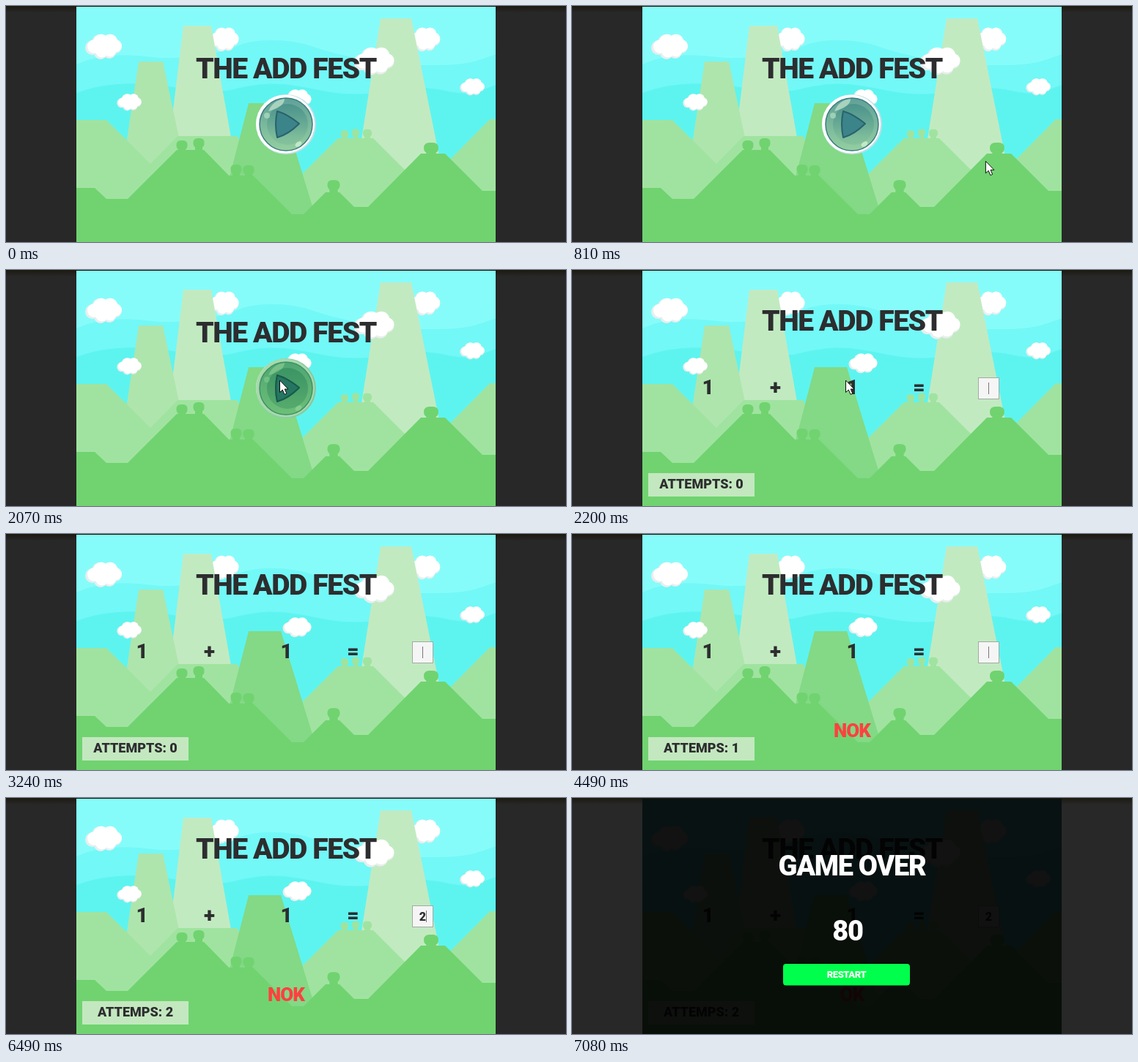
Recreate the animation shown at these times as an HTML page. Size 764x323 px, loop 8000 ms.

```html
<!DOCTYPE html>
<html lang="en">
<head>
<meta charset="utf-8">
<title>The Add Fest</title>
<style>
  html, body { margin: 0; width: 764px; height: 323px; overflow: hidden; background: #282828; }
  svg { display: block; }
  text { font: 900 28px Roboto, "Open Sans", sans-serif; text-anchor: middle; fill: #2d2d2f; letter-spacing: -.035em; }
  #title { font-size: 39px; }
  #attempts { font-size: 18px; letter-spacing: 0; }
  #result { font-size: 26px; fill: #ff4040; }
  #digit { font-size: 16px; }
  #over text { fill: #fff; }
  #over .big { font-size: 38px; }
  #over .small { font-size: 13px; }
</style>
</head>
<body>
<svg width="764" height="323" viewBox="0 0 764 323">
  <defs>
    <linearGradient id="edge" x2="0" y2="1">
      <stop stop-color="#191808"/><stop offset=".25" stop-color="#1e1d18"/><stop offset="1" stop-color="#282828"/>
    </linearGradient>
    <linearGradient id="glass" x2="0" y2="1">
      <stop stop-color="#5fa198"/><stop offset="1" stop-color="#94cfa0"/>
    </linearGradient>
    <linearGradient id="shade" x2="0" y2="1">
      <stop stop-color="#2f7d7c" stop-opacity=".45"/><stop offset=".8" stop-color="#2f7d7c" stop-opacity=".1"/>
    </linearGradient>
    <clipPath id="stage"><path d="M96 1H668V323H96Z"/></clipPath>
    <g id="puffs">
      <circle cx="-15" cy="1" r="10"/><circle cx="-5" cy="-6" r="11"/><circle cx="8" cy="-6" r="11"/>
      <circle cx="16" cy="0" r="9"/><circle cx="8" cy="7" r="9"/><circle cx="-4" cy="8" r="9"/>
    </g>
    <g id="cloud">
      <use href="#puffs" fill="#e9eeee"/>
      <use href="#puffs" fill="#fff" transform="translate(1.5 -1.5) scale(.94)"/>
    </g>
    <g id="tree">
      <rect x="-7.5" y="-14" width="15" height="13" rx="5.5"/><path d="M-5-6H5V3H-5Z"/>
    </g>
    <path id="arrow" d="M370 144Q384 148 400 161Q385 176 370 180Q366 162 370 144Z" stroke-width="2" stroke-linejoin="round"/>
  </defs>

  <path fill="#282828" d="M0 0H764V323H0Z"/>
  <path fill="url(#edge)" d="M0 0H764V9H0Z"/>

  <g clip-path="url(#stage)">
    <path fill="#86fcfa" d="M96 0H668V323H96Z"/>
    <path fill="#72f8f7" d="M96 80C130 64 165 66 200 70S290 66 315 55S385 44 420 56S510 80 570 81S640 76 668 66V323H96Z"/>
    <path fill="#5df4f0" d="M96 119C130 106 165 104 205 108S275 122 310 114S365 104 400 110S460 124 500 119S560 108 600 116S640 118 668 108V323H96Z"/>
    <use href="#cloud" transform="translate(297 46) scale(.82 .95)"/>
    <use href="#cloud" transform="translate(571 46) scale(.85 .95)"/>
    <path fill="#c2eac1" d="M242 27H280L307 180V240H216ZM511 17H553L598 240H478L485 182Z"/>
    <path fill="#aee5ad" d="M181 76H214L236 180V240H157L165 182Z"/>
    <use href="#cloud" transform="translate(133 56)"/>
    <use href="#cloud" transform="translate(502 76) scale(1.1)"/>
    <use href="#cloud" transform="translate(636 111) scale(.67)"/>
    <use href="#cloud" transform="translate(168 132) scale(.67)"/>
    <use href="#cloud" transform="translate(397 128) scale(.78)"/>
    <g fill="#a0e3a0">
      <path d="M96 156H137L197 216L234 178H315L370 264L453 181H501L548 228L596 220L660 155H668V323H96Z"/>
      <use href="#tree" transform="translate(462 180) scale(.7)"/>
      <use href="#tree" transform="translate(477 179) scale(.65 .75)"/>
      <use href="#tree" transform="translate(493 180) scale(.8)"/>
    </g>
    <path fill="#83d985" d="M331 133H375L421 284V300H288Z"/>
    <g fill="#70d370">
      <path d="M96 249H121L137 264H166L233 197H270L304 232H337L390 285H406L436 255H455L475 275H494L566 202H599L650 253H668V323H96Z"/>
      <use href="#tree" transform="translate(240 198)"/>
      <use href="#tree" transform="translate(263 195)"/>
      <use href="#tree" transform="translate(314 231)"/>
      <use href="#tree" transform="translate(331 232)"/>
      <use href="#tree" transform="translate(447 253) scale(1.13 1.06)"/>
      <use href="#tree" transform="translate(580 203) scale(1.32 1.15)"/>
    </g>

    <text id="title" x="382" y="98.5">THE ADD FEST</text>

    <g id="play">
      <circle cx="382" cy="162" r="41" fill="#c2dfe8"/>
      <circle cx="381" cy="161.5" r="40" fill="#fff"/>
      <circle cx="382" cy="162" r="36" fill="url(#glass)" stroke="#3a7c80" stroke-width="1.5"/>
      <circle cx="384" cy="162" r="28" fill="url(#shade)"/>
      <path fill="#c5e6cf" opacity=".7" d="M358 144Q364 129 380 127Q380 138 358 144Z"/>
      <circle cx="356" cy="150" r="4" fill="#a9d8bb" opacity=".8"/>
      <ellipse cx="399" cy="189" rx="5" ry="3" transform="rotate(-35 399 189)" fill="#c3e8c8"/>
      <use href="#arrow" fill="#3b848a" stroke="#2a626b"/>
      <g id="press">
        <circle cx="382" cy="162" r="41" fill="#3caa46" opacity=".45"/>
        <circle cx="384" cy="162" r="28" fill="#1d7048" opacity=".2"/>
        <use href="#arrow" fill="#257660" stroke="#185a4c"/>
      </g>
    </g>

    <g id="game">
      <text x="185" y="169.5">1</text>
      <text x="277" y="169.5">+</text>
      <text x="382" y="169.5">1</text>
      <text x="473" y="169.5">=</text>
      <rect x="554.5" y="147.5" width="28" height="29" fill="#f5f5f5" stroke="#a3aaa3"/>
      <text id="digit" x="568" y="167.5"></text>
      <path id="caret" d="M.5 154V170" stroke="#777"/>
      <rect x="104" y="278" width="145" height="32" fill="#c3e8bf"/>
      <text id="attempts" x="176.5" y="298.5"></text>
      <text id="result" x="382" y="278"></text>
    </g>

    <g id="over">
      <path d="M96 0H668V323H96Z" opacity=".93"/>
      <text class="big" x="382" y="106">GAME OVER</text>
      <text class="big" x="376" y="195">80</text>
      <rect x="288" y="227" width="173" height="29.5" rx="4" fill="#00ff4c"/>
      <text class="small" x="374.5" y="245.5">RESTART</text>
    </g>
  </g>

  <path id="cursor" d="M.5 0V16.5L4.3 13L7 19.3L9.8 18L7.2 12H12Z" fill="#fff" stroke="#111" stroke-linejoin="round"/>
</svg>
<script>
const LOOP = 8000, START = 2200, END = 7080;
const $ = id => document.getElementById(id);
const show = (id, on) => $(id).style.display = on ? '' : 'none';
const write = (id, s) => { if ($(id).textContent !== s) $(id).textContent = s; };

// Input field: time, typed digit, caret x (0 = hidden)
const field = [
  [START, '', 568], [2690, '', 0], [3240, '', 568], [3830, '', 0],
  [4150, '1', 0], [4490, '', 568], [5080, '', 0], [5430, '3', 573],
  [5900, '', 568], [6490, '2', 573], [END, '2', 0]
];

function moveCursor(t) {
  show('cursor', t >= 680 && t < 3240);
  const p = Math.max(0, Math.min(1, Math.floor((t - 680) / 67.5) / 8)), q = 1 - p;
  const curve = (a, b, c) => q * q * a + 2 * p * q * b + p * p * c;
  $('cursor').setAttribute('transform', `translate(${curve(606, 430, 373)} ${curve(250, 85, 151)})`);
  $('cursor').setAttribute('opacity', t < 3100 ? 1 : t < 3170 ? .6 : .3);
}

function draw(now) {
  const t = now % LOOP, playing = t >= START;
  $('title').setAttribute('y', playing ? 82.5 : 98.5);
  show('play', !playing);
  show('game', playing);
  show('over', t >= END);
  $('press').setAttribute('opacity', t < 1880 ? 0 : t < 1975 ? .5 : t < 2070 ? .8 : 1);
  moveCursor(t);

  const [, digit, caret] = field.findLast(s => t >= s[0]) || field[0];
  write('digit', digit);
  show('caret', caret);
  $('caret').setAttribute('transform', `translate(${caret})`);
  write('attempts', t < 4490 ? 'ATTEMPTS: 0' : t < 5900 ? 'ATTEMPS: 1' : 'ATTEMPS: 2');
  write('result', t < 4490 ? '' : t < END ? 'NOK' : 'OK');
  requestAnimationFrame(draw);
}
requestAnimationFrame(draw);
</script>
</body>
</html>
```
